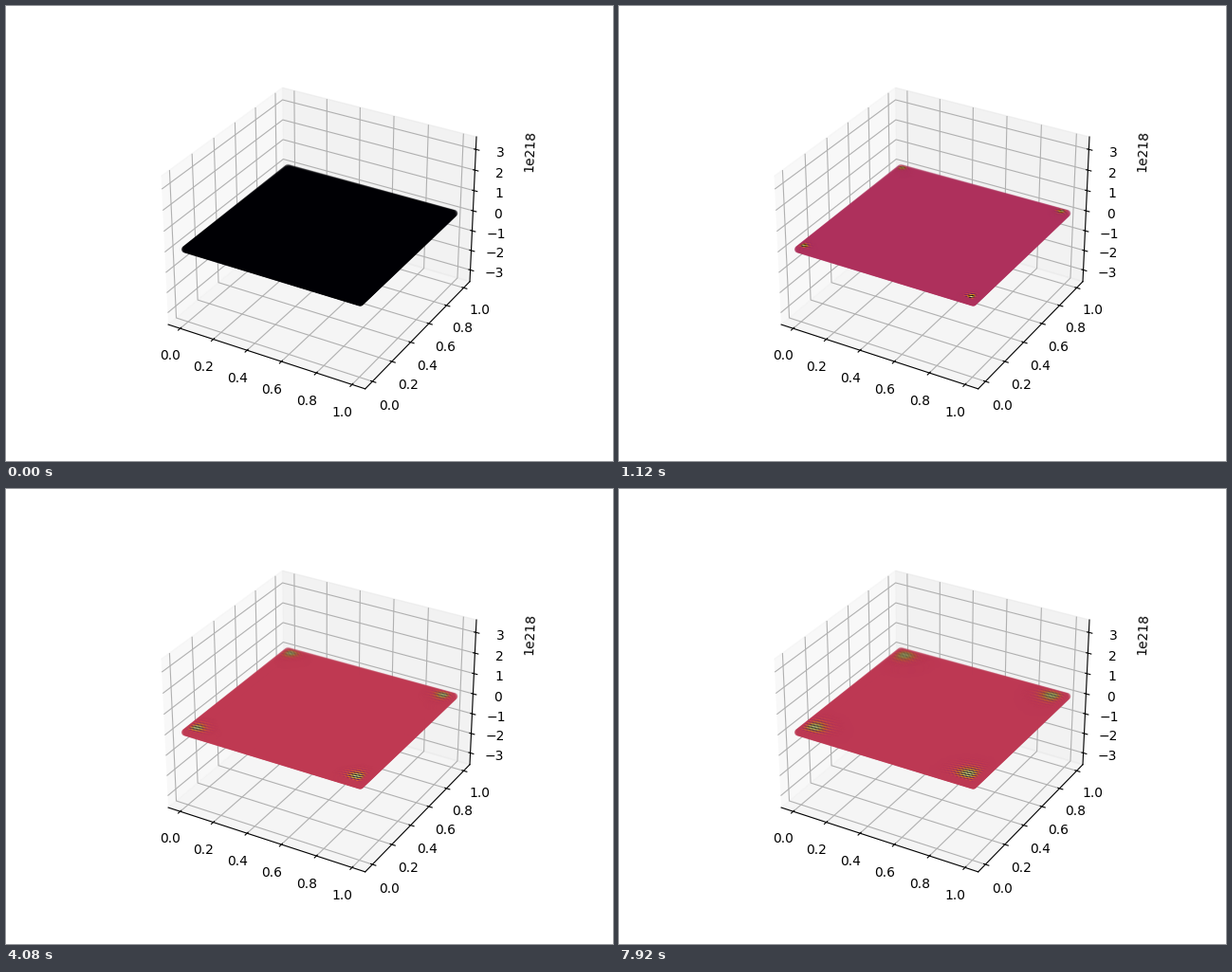
These frames come from a looping animation (640x480 px, 8 s). A matplotlib script:

```python
import numpy as np
import matplotlib.pyplot as plt
from matplotlib.animation import FuncAnimation
from matplotlib.ticker import FuncFormatter
from mpl_toolkits.mplot3d.art3d import Poly3DCollection

FRAMES, INTERVAL = 100, 80
N = 100          # grid points per side
R = 0.478        # diffusion number, above the stability limit of 0.25
CORNER, RIM, INSET = 24, 6, 4


def step(u):
    """One explicit heat step with hot edges."""
    new = np.ones_like(u)
    mid = u[1:-1, 1:-1]
    around = u[2:, 1:-1] + u[:-2, 1:-1] + u[1:-1, 2:] + u[1:-1, :-2]
    new[1:-1, 1:-1] = mid + R * (around - 4 * mid)
    return new


def normalise(u):
    span = np.ptp(u)
    return (u - u.min()) / span if span else np.zeros_like(u)


def simulate():
    u = np.zeros((N, N))
    shades = []
    for _ in range(FRAMES):
        shades.append(normalise(u))
        u = step(u)
    return shades


shades = simulate()
cmap = plt.get_cmap("inferno")
axis = np.linspace(0, 1, N)
X, Y = np.meshgrid(axis, axis)

# The flat middle is one polygon; only the rim and corners need single markers.
idx = np.arange(N)
edge = np.minimum(idx, N - 1 - idx)
ex, ey = np.meshgrid(edge, edge)
marked = (np.minimum(ex, ey) < RIM) | (np.maximum(ex, ey) < CORNER)

fig = plt.figure(figsize=(6.4, 4.8), dpi=100)
ax = fig.add_subplot(projection="3d", computed_zorder=False)

lo, hi = axis[INSET], axis[-1 - INSET]
middle = Poly3DCollection(
    [[(lo, lo, 0), (hi, lo, 0), (hi, hi, 0), (lo, hi, 0)]],
    facecolors=[cmap(0.0)], linewidths=0, zorder=1)
ax.add_collection3d(middle)
dots = ax.scatter(X[marked], Y[marked], np.zeros(marked.sum()),
                  c=shades[0][marked], cmap=cmap, vmin=0, vmax=1, zorder=2)

pad = 0.05 + 1.1 / 48
ax.set_xlim(-pad, 1 + pad)
ax.set_ylim(-pad, 1 + pad)
ax.set_zlim(-3.6, 3.6)
ax.set_zticks(range(-3, 4))
# Heights are in units of 1e218.
units = FuncFormatter(lambda v, _: f"{v:.0f}".replace("-", "\u2212"))
units.set_offset_string("1e218")
ax.zaxis.set_major_formatter(units)


def update(i):
    shade = shades[i]
    dots.set_array(shade[marked])
    middle.set_facecolor([cmap(shade[N // 2, N // 2])])
    return dots, middle


anim = FuncAnimation(fig, update, frames=FRAMES, interval=INTERVAL,
                     repeat=True, repeat_delay=0, blit=False)
plt.show()
```
